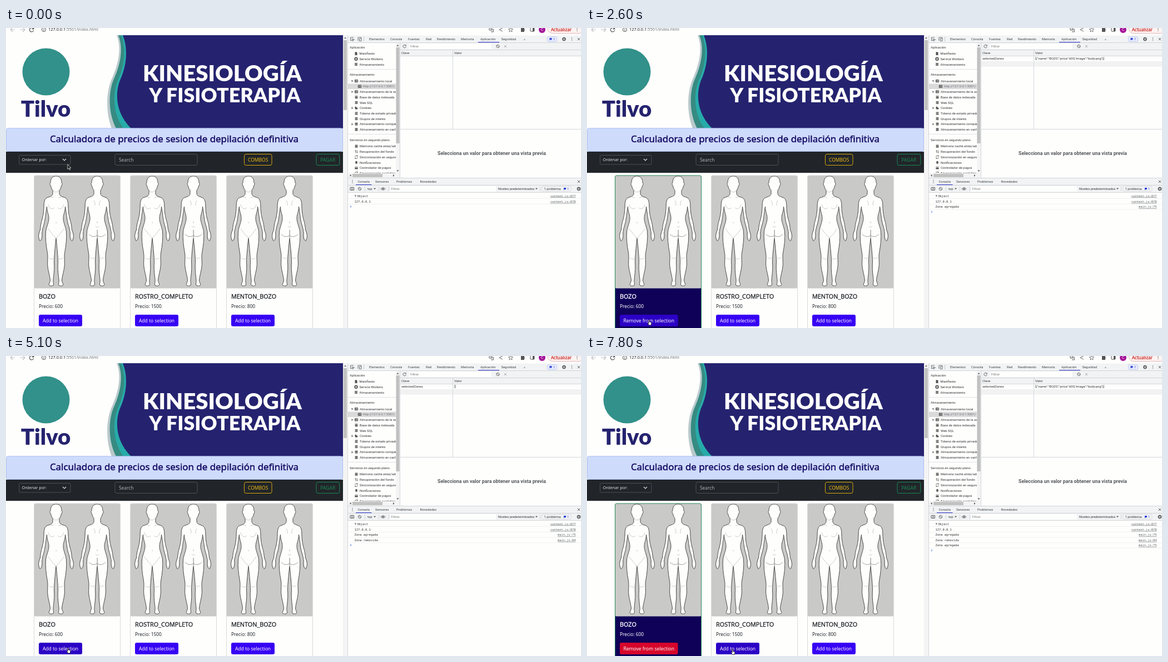
Write an HTML page that moves like this. It is 1034 by 541 pixels and loops after 8000 ms.

```html
<!DOCTYPE html>
<html lang="es">
<head>
<meta charset="utf-8">
<title>Calculadora de precios</title>
<style>
html, body { margin: 0; width: 100%; height: 100%; overflow: hidden; background: #fefefd; }
svg { display: block; width: 100%; height: 100%; }
text { white-space: pre; }
.page { font-family: Ubuntu, "Noto Sans", "Open Sans", sans-serif; }
.hero { font-family: Lato, sans-serif; font-weight: 900; }
.tool { font-family: Roboto, sans-serif; }
.mono { font-family: "DejaVu Sans Mono", monospace; }
</style>
</head>
<body>
<svg id="stage" viewBox="0 0 1034 541">
  <defs>
    <clipPath id="side"><rect x="615" y="27" width="86" height="235"/></clipPath>
    <path id="half" fill="#fefefc" stroke="#4c4c4c" d="M0 267C7 267 10 272 10 279C11.6 279 11 284 9.4 285C8.6 289 7.5 291 6 292.5V299C6.5 303 11 304 15 305.500C20 307 21.500 312 21.800 319C22 328 22.500 336 25 345C27.500 353 28 358 28.500 364C31 369 32 375 31 379L29.500 383.500C27.500 384 26 382 25.500 379L25 374L25.300 370C25 366 23.500 359 21.500 353C19.500 346 19 337 16.500 322C16.500 331 13 336 13 343C13 351 17 357 18.500 367C19.500 379 18 392 15.800 404C14 412 15.800 420 15.300 428C14.500 438 11 447 10.500 455C11 459 13 461 12.700 463.500C11 466 5.500 465.500 4.500 463C4.500 459 5.500 457 5 454C4.500 447 2.800 438 3.200 428C3.800 420 3.300 413 2.600 406C1.800 396 1 387 0 379"/>
    <g id="frontHalf"><use href="#half"/>
      <path fill="none" stroke="#aaa" stroke-width=".6" d="M6 292Q4 296 0 296M4 306Q10 303 15 306M3 324C6 328 13 326 14 318M14 362Q8 371 0 379M0 350v2M5 416q3 2 7-1M28 379v4"/></g>
    <g id="backHalf"><use href="#half"/>
      <path fill="none" stroke="#aaa" stroke-width=".6" d="M6 311Q3 315 4 320M0 349v3M3 357l-3 3M5 415q3 2 7-1M28 379v4"/>
      <path fill="none" stroke="#777" stroke-width=".7" d="M0 364V379M0 374C5 378 11 376 15 372"/></g>
    <g id="front"><use href="#frontHalf"/><use href="#frontHalf" transform="scale(-1 1)"/></g>
    <g id="back"><use href="#backHalf"/><use href="#backHalf" transform="scale(-1 1)"/></g>
    <path id="gear" fill="none" stroke="#555" stroke-width="1.5" d="M0-2.100A2.100 2.100 0 1 1-.01-2.100M0-3.500v1M0 2.500v1M-3.500 0h1M2.500 0h1M-2.500-2.500l.7.7M1.800 1.800l.7.7M2.500-2.500l-.7.7M-1.800 1.800l-.7.7"/>
    <path id="close" stroke="#555" stroke-width=".9" d="M-2.200-2.200L2.200 2.200M2.200-2.200L-2.200 2.200"/>
    <path id="reload" fill="none" stroke="#555" stroke-width=".9" d="M2-1.800A2.700 2.700 0 1 0 2.700.5M2.700-3v2H.8"/>
    <path id="block" fill="none" stroke="#555" stroke-width=".9" d="M0-2.700A2.700 2.700 0 1 1-.01-2.700M-1.900-1.900L1.900 1.900"/>
    <path id="dots" stroke="#555" stroke-width="1.300" stroke-linecap="round" d="M0-2.300v0M0 0v0M0 2.300v0"/>
    <path id="grid" fill="none" stroke="#555" stroke-width=".9" d="M-2.700-2.200h5.400v4.400h-5.400zM-2.700-.7h5.400M-2.700.8h5.400M-.8-2.200v4.400"/>
    <path id="page" fill="#555" d="M-2-2.800H.8L2-1.500V2.800H-2z"/>
    <path id="store" fill="#555" d="M-2.400-2.500h4.800v1.400h-4.800zM-2.400-.7h4.800v1.400h-4.800zM-2.400 1.100h4.800v1.400h-4.800z"/>
    <path id="sync" fill="none" stroke="#555" stroke-width=".9" d="M-2.500-.5A2.600 2.600 0 0 1 2-1.800M2.500.5A2.600 2.600 0 0 1-2 1.800M2.200-3v1.500H.7M-2.200 3V1.500H-.7"/>
    <path id="bell" fill="#555" d="M-2.300 1.700L-1.700.8V-1A1.700 1.700 0 0 1 1.700-1V.8L2.300 1.700zM-.7 2.100H.7V2.800H-.7z"/>
    <path id="card" fill="#555" d="M-2.700-2.100h5.400v1h-5.400zM-2.700-.3h5.400v2.400h-5.400z"/>
    <path id="arrows" fill="none" stroke="#555" stroke-width=".8" d="M-1.400 2.400v-4.600M-2.400-1l1-1.300 1 1.300M1.400-2.400v4.600M.4 1l1 1.300 1-1.300"/>
    <path id="cookie" fill="#555" d="M0-2.700A2.700 2.700 0 1 0 2.700 0L1 0 1-1 0-1z"/>
    <path id="badge" fill="#2f41d3" d="M-2-2H2V1.300H-.7L-2 2.500z"/>
  </defs>
</svg>
<script>
const stage = document.getElementById('stage');
const INK = '#303134', BAR = '#f1f3f4', EDGE = '#cacdd1', NAVY = '#25236f', DEEP = '#0f0058';
const BLUE = '#3700f4', BLUE_HOVER = '#2c00c6', MIXED = '#a1033a', RED = '#d6052b', RED_HOVER = '#b30420';

const text = (x, y, str, size, fill = INK, attrs = '') =>
  `<text x="${x}" y="${y}" font-size="${size}" fill="${fill}" ${attrs}>${str}</text>`;
const mid = 'text-anchor="middle"', end = 'text-anchor="end"';
// A thin outline gives a medium weight between regular and bold
const medium = (x, y, str, size, fill, attrs = '') =>
  text(x, y, str, size, fill, `${attrs} stroke="${fill}" stroke-width="${size * .025}"`);
const rect = (x, y, w, h, fill, attrs = '') =>
  `<rect x="${x}" y="${y}" width="${w}" height="${h}" fill="${fill}" ${attrs}/>`;
const frame = (x, y, w, h, stroke, r = 3, fill = 'none') => rect(x, y, w, h, fill, `rx="${r}" stroke="${stroke}"`);
const path = (d, fill = 'none', stroke = 'none', width = 1) =>
  `<path d="${d}" fill="${fill}" stroke="${stroke}" stroke-width="${width}"/>`;
const icon = (id, x, y) => `<use href="#${id}" x="${x}" y="${y}"/>`;
const group = (cls, ...parts) => `<g class="${cls}">${parts.join('')}</g>`;
const label = (x, y, str, fill, attrs) => text(x, y, str, 5.9, fill, attrs);

function browserBar() {
  return group('page',
    path('M16 3H8M12-1L8 3L12 7M25 3H33M30-1L34 3L30 7', 'none', '#bdbfc2', 1.1),
    path('M49 1A3.700 3.700 0 1 0 49.700 4M49.700-1V1.800H47', 'none', '#555', 1.2),
    '<circle cx="68" cy="3" r="3.600" fill="none" stroke="#555"/>', rect(67.5, 2.4, 1, 2.8, '#555'), rect(67.5, .8, 1, 1, '#555'),
    text(76, 5.4, '127.0.0.1<tspan fill="#6c6f73">:5501/index.html</tspan>', 7.4, '#222'),
    path('M869-1h4v5h-4zM873 2h3.500v5H872', '#ddd', '#555', .8),
    path('M893 0L887 3L893 6', 'none', '#555', .9),
    path('M907.500-1l1.100 2.800 3 .2-2.300 1.900.8 2.900-2.600-1.600-2.600 1.600.8-2.900-2.300-1.900 3-.2z', 'none', '#555', .8),
    path('M926 0h2a1 1 0 0 1 2 0h2v2.300a1 1 0 0 1 0 2V7h-6z', '#555'),
    frame(943, -2, 7, 8, '#555', 1), rect(947, -2, 3, 8, '#555'),
    '<circle cx="964" cy="3" r="6" fill="#a5159b"/>', text(964, 5.3, 'C', 6.5, '#fff', mid),
    frame(974.5, -8, 66, 17.500, '#e2b3b3', 8, '#fdf3f2'),
    medium(980, 5.8, 'Actualizar', 8, '#c5221f'), icon('dots', 1027, 3));
}

function hero() {
  const wave = (top, middle, low, bottom, fill) =>
    path(`M${top} 13C${top + 11} 40 ${middle + 9} 72 ${middle} 92S${low} 150 ${bottom} 181H606V13Z`, fill);
  return wave(199, 190, 178, 190, '#b9c9cb') + wave(202, 194, 182, 198, '#368b82') +
    wave(207, 202, 189, 211, '#27aba9') + wave(210, 206, 194, 225, NAVY) +
    '<circle cx="72" cy="79" r="42.500" fill="#32918a"/>' +
    group('hero', text(71.500, 160, 'Tilvo', 40, NAVY, mid),
      text(389, 95.500, 'KINESIOLOGÍA', 40.200, '#fefefd', mid),
      text(393.5, 133.500, 'Y FISIOTERAPIA', 35.8, '#fefefd', mid));
}

function pageBars() {
  return group('page',
    frame(.5, 180.800, 605, 41.700, '#a9bff3', 3, '#cfdbfb'),
    medium(302.5, 205.500, 'Calculadora de precios de sesion de depilación definitiva', 16.900, '#120860', mid),
    rect(0, 223, 606, 38.200, '#212529'),
    frame(23.5, 229.500, 92.500, 16.500, '#495057', 2), text(28.5, 240.300, 'Ordenar por:', 7.3, '#dee2e6'),
    path('M102 236L105 239L108 236', 'none', '#dee2e6', 1.2),
    frame(196, 227.500, 148, 20, '#495057'), text(203, 240.800, 'Search', 8.4, '#aeb2b6'),
    frame(428.5, 227.500, 49.500, 20, '#d9a810'), text(453.2, 240.800, 'COMBOS', 8.5, '#f0bb14', mid),
    frame(558, 227.500, 41.800, 20, '#198754'), text(578.8, 240.800, 'PAGAR', 8.5, '#198754', mid));
}

function card(i, name, price, selected, color) {
  const ink = selected ? '#fefefd' : '#212529', wide = selected ? 104.5 : 78;
  return `<g class="page" transform="translate(${173 * i})">` +
    rect(50.500, 266, 155, 290, selected ? DEEP : '#fefefd', 'rx="3"') +
    rect(50.500, 266, 155, 203.500, '#c9c9c8', 'rx="2.500"') +
    '<use href="#front" x="90"/><use href="#back" x="164"/>' +
    frame(50.5, 266, 155, 290, selected ? '#258a58' : '#d9dadb') +
    medium(59, 488.300, name, 10.8, ink) +
    text(59, 505.300, `Precio: ${price}`, 8.4, ink) +
    rect(59, 517, wide, 21, color, 'rx="3"') +
    text(59 + wide / 2, 530.800, selected ? 'Remove from selection' : 'Add to selection', 8.5, '#fefefd', mid) + '</g>';
}

function scrollbar() {
  return rect(606, 13, 8, 528, '#f4f4f4') + rect(607, 22, 6, 126, '#c1c1c1') + path('M608 19H612L610 16.500Z', '#666');
}

// Each entry: icon, text x, baseline, label
const sideItems = [
  ['', 618, 37.3, 'Aplicación'], ['page', 635.5, 48.2, 'Manifiesto'], ['gear', 635.5, 57.9, 'Service Workers'],
  ['store', 635.5, 67.7, 'Almacenamiento'], ['', 618, 86.3, 'Almacenamiento'], ['grid', 636, 97.7, 'Almacenamiento local'],
  ['grid', 642, 107.4, 'http://127.0.0.1:5501/'], ['grid', 636, 117, 'Almacenamiento de la sesión'],
  ['store', 636, 126.8, 'Base de datos indexada'], ['store', 636, 136.5, 'Web SQL'], ['cookie', 636, 146.2, 'Cookies'],
  ['store', 636, 156, 'Tokens de estado privado'], ['store', 636, 165.700, 'Grupos de interés'],
  ['store', 636, 175.4, 'Almacenamiento compartido'], ['store', 636, 185.1, 'Almacenamiento en caché'],
  ['', 618, 203.900, 'Servicios en segundo plano'], ['store', 636, 215.300, 'Memoria caché atrás/adelante'],
  ['arrows', 636, 225, 'Recuperación del fondo'], ['sync', 636, 234.800, 'Sincronización en segundo plano'],
  ['bell', 636, 244.600, 'Notificaciones'], ['card', 636, 254.400, 'Controlador de pagos'], ['sync', 636, 264.200, 'Sincronización periódica']
];

function sidebar() {
  const right = y => path(`M621.500 ${y - 2}L624.300 ${y}L621.500 ${y + 2}Z`, '#666');
  return '<g clip-path="url(#side)">' + rect(615, 100.500, 86, 9.600, '#dadadb') +
    path('M615 74.500H701M615 191.500H701', 'none', '#dfe1e4') +
    sideItems.map(([id, x, y, str]) => label(x, y, str, x > 640 ? '#686b70' : INK) + (id && icon(id, x - 6, y - 2.100))).join('') +
    path('M620.500 94.500H624.500L622.500 97.300Z', '#666') + [115, 144.200, 173.400].map(right).join('') + '</g>' +
    rect(701, 27, 7, 235, '#f4f4f4') + rect(701.5, 35, 6, 173, '#c1c1c1') +
    path('M702.500 32.500H706.500L704.500 30ZM702.500 256.500H706.500L704.500 259Z', '#555') +
    rect(615, 262, 93, 8, '#f4f4f4') + rect(623, 263, 54, 6, '#c1c1c1') +
    path('M620.500 264V268L618 266ZM696 264V268L698.500 266Z', '#555');
}

function devtools() {
  const tabs = [[653, 'Elementos'], [691, 'Consola'], [723, 'Fuentes'], [755, 'Red'], [775, 'Rendimiento'],
    [818, 'Memoria'], [853, 'Aplicación'], [890.5, 'Seguridad'], [931, '»']];
  const drawer = [[632.5, 'Consola'], [664, 'Sensores'], [702, 'Problemas'], [744.5, 'Novedades']];
  const tab = y => ([x, str]) => label(x, y, str, '#3f4246');
  return group('tool',
    rect(614, 13.500, 420, 13, BAR), tabs.map(tab(21.8)).join(''), rect(849, 25, 38, 1.500, '#3a40cf'),
    path('M625 17H619.500V22.500H622M622 19.500L626.500 21L624.300 21.800L623.500 24Z', 'none', '#555', .8),
    path('M633 23V17H639V18.500M635.500 19h3.500v4.500h-3.500z', 'none', '#555', .8), path('M643.500 15.500V24.500', 'none', EDGE),
    frame(973.5, 15.500, 17, 9, '#c5cdf2', 2, '#e6ebfc'), icon('badge', 979.500, 20), label(984, 22, '1', '#2f41d3'),
    icon('gear', 1003.500, 20), icon('dots', 1017.500, 20), icon('close', 1030, 20),
    sidebar(),
    rect(709, 27, 325, 23, BAR), rect(724.5, 28, 148, 10, '#fefefd'), icon('reload', 716.5, 33), label(727, 35, 'Filtrar', '#777'),
    icon('block', 884.500, 33), `<g opacity=".5">${icon('close', 898, 33)}</g>`,
    label(711, 46.600, 'Clave'), label(806, 46.600, 'Valor'),
    text(873.5, 229.400, 'Selecciona un valor para obtener una vista previa', 8.85, '#55585c', `${mid} font-weight="700"`),
    rect(614, 271, 420, 25.500, BAR), drawer.map(tab(278.700)).join(''), rect(629, 282, 28.500, 1.500, '#3a40cf'),
    icon('dots', 623, 277), icon('close', 1030, 277),
    frame(619, 287.500, 6.500, 5, '#555', .5), path('M621.500 288.500V291.700L624 290.100Z', '#555'), icon('block', 636, 290),
    label(650, 291.900, 'top'), path('M661 288.700H665L663 291.300ZM952 288.700H956L954 291.300Z', '#555'),
    path('M674 290Q678 285.800 682 290Q678 294.200 674 290Z', 'none', '#555', .9), '<circle cx="678" cy="290" r="1.300" fill="#555"/>',
    rect(690, 285, 191, 10, '#fefefd'), label(692.5, 291.900, 'Filtrar', '#777'), label(885, 291.900, 'Niveles predeterminados'),
    frame(963.5, 285.500, 52.500, 8.800, '#dadce0', 2, BAR), label(967.5, 291.900, '1 problema:'), icon('badge', 1005, 290), label(1009, 291.900, '1', '#2f41d3'),
    icon('gear', 1030, 290),
    path('M614.500 13.500V541M614 26.500H1034M708.500 27V270M709 39.500H1034M709 50.500H1034M803.500 39.500V182M709 182.500H1034M614 270.500H1034M614 283.500H1034M614 296.500H1034M645.500 286V294M670.500 286V294M688.500 286V294M960.500 286V294', 'none', EDGE, .8));
}

function storage(selected) {
  const value = selected ? '[{"name":"BOZO","price":600,"image":"body.png"}]' : '[]';
  return group('tool', rect(709, 60, 94, 9.500, '#f2f2f3'), rect(804, 60, 230, 9.500, '#f2f2f3'),
    label(711, 56.800, 'selectedZones'), label(806, 56.800, value));
}

const log = [['Object', 'content.js:877'], ['127.0.0.1', 'content.js:878'],
  ['Zona agregada', 'main.js:75'], ['Zona removida', 'main.js:84'], ['Zona agregada', 'main.js:75']];

function consoleLog(count) {
  const rows = log.slice(0, count).map(([msg, link], i) => {
    const y = i ? 305.200 + 9.550 * i : 304.500;
    return text(i ? 626.5 : 631.5, y, msg, 5.4) + text(1024.500, y, link, 5.4, '#5c5f63', `${end} text-decoration="underline"`) +
      path(`M615 ${y + 2.900}H1034`, 'none', '#f0f0f0', .8);
  });
  const y = 303 + 9.500 * count;
  return group('mono', ...rows, path('M627.500 300.500V304.500L630 302.500Z', '#666'),
    path(`M619 ${y - 1.800}L621 ${y}L619 ${y + 1.800}`, 'none', '#3a6fe8', .9));
}

// Cursor path: time, x, y
const moves = [[0, 110.5, 245.5], [400, 110.5, 245.5], [900, 92, 381], [1000, 92, 381], [1400, 92, 463],
  [1500, 92, 463], [1900, 103.5, 512], [2200, 109, 525.5], [7100, 109, 525.5], [7500, 299.5, 530], [7700, 299.5, 530], [7800, 259, 528], [8000, 259, 528]];
const firstColors = [[0, BLUE], [2000, BLUE_HOVER], [2700, MIXED], [2800, RED_HOVER], [5100, BLUE_HOVER],
  [6400, MIXED], [6800, RED_HOVER], [7200, RED]];

function cursor(t) {
  const i = moves.findIndex(m => m[0] > t), [t0, x0, y0] = moves[i - 1], [t1, x1, y1] = moves[i];
  const p = (t - t0) / (t1 - t0), hand = t >= 1900 && t < 7200 || t >= 7400;
  const shape = hand
    ? path('M2 .7c.8-.5 1.500 0 1.500.9v3l2.400.5c.8.2 1.100.6 1 1.500L6.400 10.500H2.400L.4 6.800c-.2-.8.6-1.100 1.100-.5l.5.6z', '#fff', '#111', .8)
    : path('M.3.3V9L2.300 7.300L3.700 10.300L5 9.700L3.700 6.700H6.300Z', '#161616', '#fff', .7);
  return `<g transform="translate(${x0 + (x1 - x0) * p} ${y0 + (y1 - y0) * p})">${shape}</g>`;
}

const base = rect(0, 0, 1034, 541, '#fefefd') + browserBar() + hero() + pageBars() + scrollbar() + devtools();
stage.insertAdjacentHTML('beforeend', base + '<g id="live"></g>');
const live = document.getElementById('live');

let shown = -1;
function draw(now) {
  const t = Math.floor(now % 8000 / 100) * 100;
  if (t !== shown) {
    shown = t;
    const selected = t >= 2600 && t < 5100 || t >= 6300;
    const color = firstColors.filter(c => c[0] <= t).pop()[1];
    const count = 2 + [2600, 5100, 6300].filter(s => t >= s).length;
    live.innerHTML = card(0, 'BOZO', 600, selected, color) +
      card(1, 'ROSTRO_COMPLETO', 1500, false, t >= 7500 ? BLUE_HOVER : BLUE) +
      card(2, 'MENTON_BOZO', 800, false, BLUE) +
      (t >= 2600 ? storage(selected) : '') + consoleLog(count) + cursor(t);
  }
  requestAnimationFrame(draw);
}
requestAnimationFrame(draw);
</script>
</body>
</html>
```
